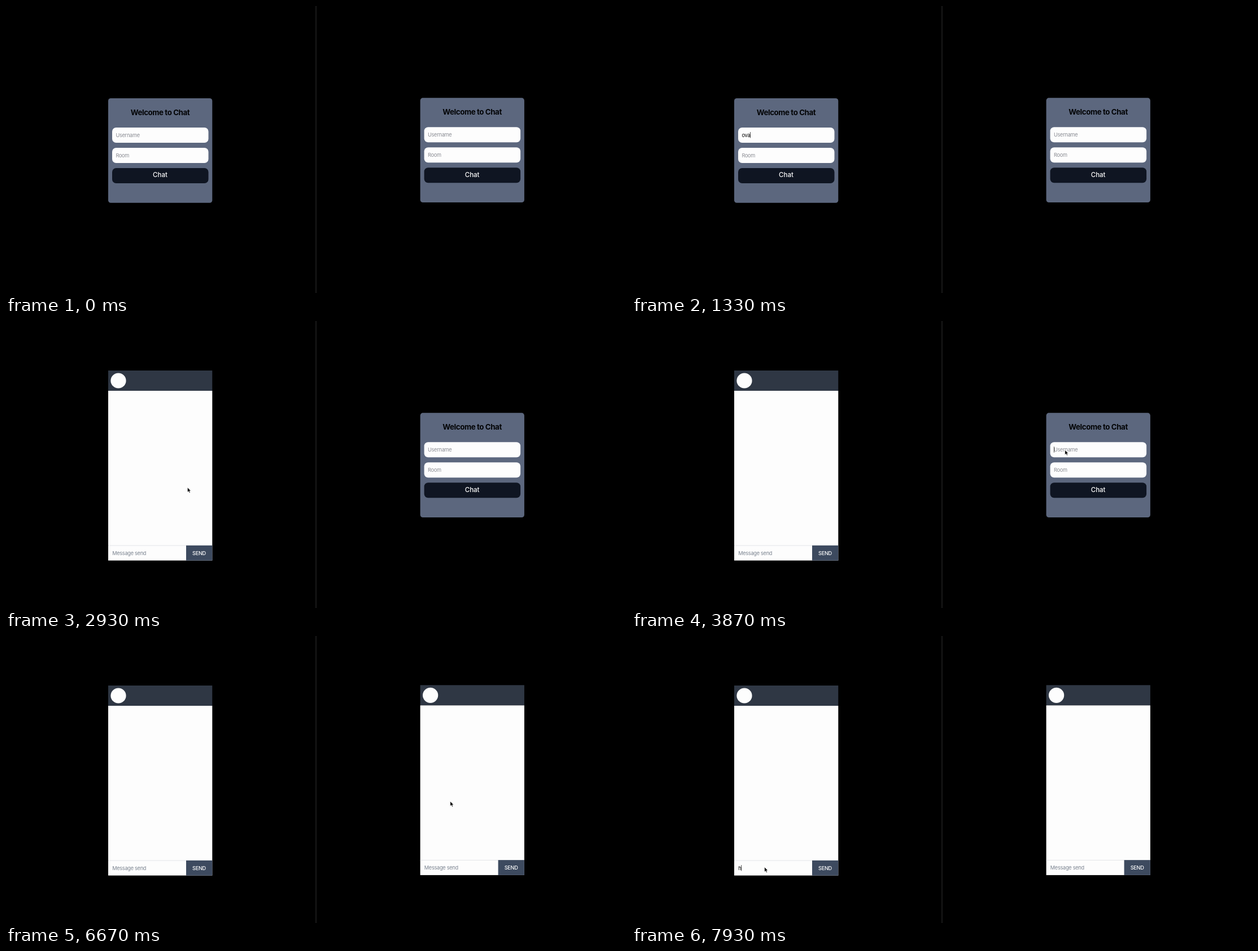
These frames come from a looping animation (1098 px wide and 510 px high, 8000 ms). An HTML page:

```html
<!DOCTYPE html>
<html lang="en">
<head>
<meta charset="utf-8">
<title>Chat</title>
<style>
  html, body { margin: 0; width: 100%; height: 100%; overflow: hidden; background: #000; }
  svg { display: block; width: 1098px; height: 510px; }
  text { font: 9.2px Inter, "Liberation Sans", sans-serif; letter-spacing: -.28px; white-space: pre; }
  .mid { text-anchor: middle; }
  .title { font-size: 13.3px; font-weight: 700; letter-spacing: -.4px; fill: #030406; }
  .button { font-size: 11.5px; font-weight: 500; letter-spacing: 0; fill: #fdfdfd; }
  .send { font-weight: 500; fill: #fdfdfd; }
  .caret { fill: #222; }
</style>
</head>
<body>
<svg id="stage" viewBox="0 0 1098 510">
  <rect width="1098" height="510"/>
  <rect x="548" width="2" height="510" fill="#181818"/>
  <g id="left"></g>
  <g id="right" transform="translate(552.6 -.7)"></g>
  <path id="pointer" d="M0 0V8.6L2 6.8L3.4 9.8L4.9 9.1L3.6 6.2H6.2Z"
        fill="#000" stroke="#fff" stroke-width=".7" stroke-linejoin="round"/>
</svg>
<script>
const LOOP = 8000, FPS = 15;

const box = (y, fill) => `<rect x="188" y="${y}" width="170.5" height="27" rx="7" fill="${fill}"/>`;

const field = (name, x, y) => `
  <text class="${name}" x="${x}" y="${y}"></text>
  <rect class="caret ${name}-caret" y="${y - 8.6}" width=".8" height="10.4"/>`;

const panel = `
  <g class="login">
    <rect x="181" y="164" width="184.3" height="185.8" rx="4.6" fill="#5c677e"/>
    <text class="title mid" x="273" y="193.6">Welcome to Chat</text>
    ${box(216, "#fdfdfd")} ${box(252, "#fdfdfd")} ${box(288, "#0f1522")}
    <text class="button mid" x="273" y="304.4">Chat</text>
    ${field("user", 194.4, 232.6)}
    ${field("room", 194.4, 268.6)}
  </g>
  <g class="chat">
    <rect x="181" y="88" width="184.3" height="36" fill="#2f3744"/>
    <rect x="181" y="124" width="184.3" height="301.6" fill="#fdfdfd"/>
    <circle cx="199" cy="106" r="13.6" fill="#fdfdfd"/>
    <rect x="181" y="398.6" width="138" height=".8" fill="#dcdfe3"/>
    <rect x="319" y="398.8" width="46.3" height="26.8" fill="#3d4a5f"/>
    <text class="send mid" x="342" y="415.6">SEND</text>
    ${field("message", 188.2, 415.6)}
  </g>`;

// focus: when the caret arrives; type: first and last keystroke; slow: power of the slowdown
const sides = {
  left: {
    opens: 2800,
    user: { hint: "Username", text: "ovan", focus: 930, type: [1060, 1660], slow: 2 },
    room: { hint: "Room", text: "123", focus: 1930, type: [2330, 2530] },
    message: { hint: "Message send", text: "h", focus: 7670, type: [7930, LOOP] }
  },
  right: {
    opens: 6600,
    user: { hint: "Username", text: "gunvefil", focus: 3800, type: [4270, 5000] },
    room: { hint: "Room", text: "123", focus: 5200, type: [5600, 5800] },
    message: { hint: "Message send", text: "", focus: LOOP, type: [LOOP, LOOP] }
  }
};

// The pointer rests after each move until the next one, or until typing hides it
const moves = [
  { start: 200, end: 930, hide: 1070, from: [262, 486], to: [209, 230], lift: 0 },
  { start: 2530, end: 2730, hide: 2870, from: [222, 256], to: [252, 298], lift: 0 },
  { start: 2870, end: 3730, hide: 4270, from: [252, 298], to: [766.7, 229.2], lift: -15 },
  { start: 6270, end: 6530, hide: 6800, from: [767, 230], to: [786.7, 293.7], lift: 0 },
  { start: 6800, end: 7670, hide: LOOP, from: [786.7, 293.7], to: [234.6, 410.6], lift: 80 }
];

const $ = s => document.querySelector(s);
const show = (el, on) => el.style.display = on ? "" : "none";
const easeOut = k => 1 - (1 - k) ** 2;

function typedText({ text, type: [first, last], slow = 1 }, t) {
  const keyTime = i => first + (last - first) * (i / Math.max(1, text.length - 1)) ** slow;
  return [...text].filter((_, i) => t >= keyTime(i)).join("");
}

function drawField(root, name, f, focused, t) {
  const label = root.querySelector("." + name);
  const caret = root.querySelector(`.${name}-caret`);
  const typed = typedText(f, t);
  label.textContent = typed || f.hint;
  label.style.fill = typed ? "#050505" : name === "message" ? "#7a838f" : "#8a8c93";
  show(caret, focused);
  caret.setAttribute("x", +label.getAttribute("x") + (typed ? label.getComputedTextLength() : 0));
}

function drawSide(id, t) {
  const root = $("#" + id), side = sides[id], open = t >= side.opens;
  show(root.querySelector(".login"), !open);
  show(root.querySelector(".chat"), open);
  const names = open ? ["message"] : ["user", "room"];
  const active = names.filter(n => t >= side[n].focus).pop();
  for (const n of names) drawField(root, n, side[n], n === active, t);
}

function drawPointer(t) {
  const pointer = $("#pointer");
  const m = moves.find(m => t >= m.start && t < m.hide);
  show(pointer, m);
  if (!m) return;
  const k = easeOut(Math.min(1, (t - m.start) / (m.end - m.start)));
  const [x, y] = m.from.map((v, i) => v + (m.to[i] - v) * k);
  pointer.setAttribute("transform", `translate(${x} ${y - m.lift * 4 * k * (1 - k)})`);
}

function draw() {
  const now = performance.now() % LOOP;
  // The picture advances 15 times a second, on a 10 ms clock
  const t = Math.round(Math.floor((now + 5) * FPS / 1000) * 100 / FPS) * 10 % LOOP;
  for (const id in sides) drawSide(id, t);
  drawPointer(t);
  requestAnimationFrame(draw);
}

for (const id in sides) $("#" + id).innerHTML = panel;
draw();
</script>
</body>
</html>
```
